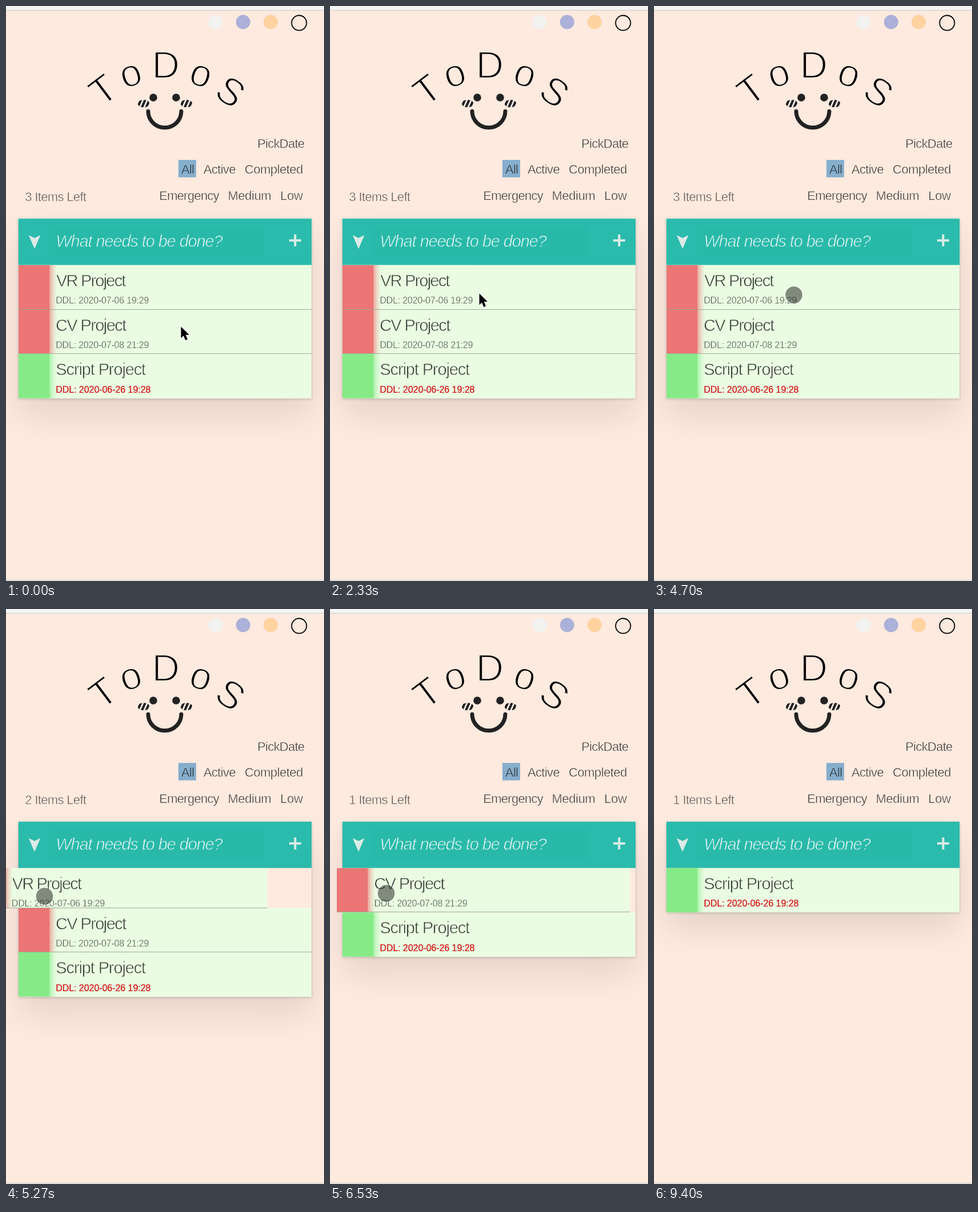
An HTML page that plays this animation: 557x1005 px, repeating every 9.43 s.

```html
<!DOCTYPE html>
<html lang="en">
<head>
<meta charset="utf-8">
<title>Todos</title>
<style>
  html, body { margin: 0; width: 100%; height: 100%; overflow: hidden; background: #feeadf; }
  #panel {
    position: absolute; left: 22px; top: 372px; width: 513px;
    box-shadow: 0 2.3px 4.7px rgba(0,0,0,.2), 0 29px 58px rgba(0,0,0,.1);
  }
  #stage { position: absolute; left: 0; top: 0; display: block; }
  text { font-family: "Liberation Sans", Arial, sans-serif; white-space: pre; }
  /* a thin outline in the backdrop colour gives the light weight */
  .logo { font-size: 67.5px; fill: #000; stroke: #feeadf; stroke-width: 2.3; text-anchor: middle; }
  .nav { font-size: 22px; fill: #2f2f2f; stroke: #feeadf; stroke-width: .6; }
  .count { fill: #565250; }
  .on { stroke: #86aecd; }
  .hint { font-size: 29px; font-style: italic; fill: #e6f5f2; stroke: #2abbac; stroke-width: .8; letter-spacing: -1.12px; }
  .name { font-size: 29px; fill: #2f332e; stroke: #eafde3; stroke-width: .8; }
  .due { font-size: 16px; fill: #4d524b; stroke: #eafde3; stroke-width: .35; letter-spacing: -.2px; }
  .late { fill: #d50b0b; stroke: #d50b0b; stroke-width: .2; letter-spacing: -.05px; }
</style>
</head>
<body>
<div id="panel"></div>
<svg id="stage" width="557" height="1005" viewBox="0 0 557 1005">
  <defs>
    <g id="blush">
      <clipPath id="cheek"><ellipse rx="10.3" ry="6.6"/></clipPath>
      <g clip-path="url(#cheek)">
        <ellipse rx="10.3" ry="6.6" fill="#fff3ea"/>
        <path d="M-11 8L-4 -8M-3.5 8L3.5 -8M4 8L11 -8" stroke="#222" stroke-width="4.2"/>
      </g>
    </g>
  </defs>
  <rect width="557" height="7" fill="#f4f4f3"/>
  <rect y="7" width="557" height="1" fill="#c9cdca"/>
  <rect y="1003" width="557" height="1" fill="#cbcac6"/>
  <rect y="1004" width="557" height="1" fill="#f4f0ec"/>

  <circle cx="367" cy="28" r="12.5" fill="#f2f2f1"/>
  <circle cx="415.3" cy="28" r="12.5" fill="#abb1d8"/>
  <circle cx="463.5" cy="28" r="12.5" fill="#ffd2a0"/>
  <circle cx="513.4" cy="29.6" r="13.1" fill="none" stroke="#000" stroke-width="1.8"/>

  <g id="logo"></g>
  <g fill="#222">
    <circle cx="258" cy="160" r="6.8"/>
    <circle cx="298" cy="160" r="6.8"/>
    <path d="M249 184A29 28.5 0 0 0 307 184" fill="none" stroke="#222" stroke-width="7" stroke-linecap="round"/>
  </g>
  <use href="#blush" x="241" y="170.5"/>
  <use href="#blush" x="316" y="170.5"/>

  <rect x="302" y="269" width="31" height="30.5" fill="#86aecd"/>
  <g id="nav"></g>

  <rect x="21.7" y="371.7" width="513.6" height="81" fill="#2abbac"/>
  <rect x="76" y="385" width="376" height="52" fill="#29b9a9"/>
  <path d="M39.7 400.5L50 405.5 60.3 400.5 50 424.5Z" fill="#dcebe7"/>
  <path d="M496 409.8H517M506.5 399.3V420.3" stroke="#dcebe7" stroke-width="4"/>
  <text class="hint" x="87.3" y="420.5">What needs to be done?</text>

  <g id="rows"></g>
  <g id="rules"></g>

  <g id="arrow">
    <path d="M.5 .5V20.5L5 16.3 8.3 24.2 12 22.6 8.8 14.8H15Z" fill="#000" stroke="#fff" stroke-width="2" stroke-linejoin="round" paint-order="stroke"/>
  </g>
  <g id="touch">
    <circle r="15.8" fill="none" stroke="#fff" stroke-opacity=".35" stroke-width="2"/>
    <circle r="14.8" fill="rgb(40,45,40)" fill-opacity=".55"/>
  </g>
</svg>
<script>
const LOOP = 9430, TOP = 452.7, ROW = 77.7, LEFT = 21.7, WIDTH = 513.6, SLIDE = 880;
const $ = id => document.getElementById(id);

function add(parent, tag, attrs, content) {
  const node = document.createElementNS('http://www.w3.org/2000/svg', tag);
  for (const key in attrs) node.setAttribute(key, attrs[key]);
  if (content) node.textContent = content;
  parent.appendChild(node);
  return node;
}

// letter, centre x, centre y, turn, half height
[['T', 170, 146.5, -37, 23.2], ['o', 219.3, 122.5, -18, 17.8],
 ['D', 279.8, 103, 0, 23.2], ['o', 340.5, 122.5, 18, 17.8], ['S', 393.5, 150, 35, 23.2]]
  .forEach(([ch, x, y, turn, half]) =>
    add($('logo'), 'text', { class: 'logo', y: half, transform: `translate(${x} ${y}) rotate(${turn})` }, ch));

function label(str, x, y, gap, extra = '') {
  return add($('nav'), 'text', { class: 'nav ' + extra, x, y, style: `letter-spacing:${gap}px` }, str);
}
label('PickDate', 440.3, 248, -.72);
label('All', 307, 292.7, -.6, 'on');
label('Active', 346, 292.7, -.65);
label('Completed', 418, 292.7, -.48);
label('Emergency', 268.3, 339.3, -.74);
label('Medium', 388.5, 339.3, -.36);
label('Low', 480.3, 339.3, -.27);
const count = label('3 Items Left', 33.2, 341, -.65, 'count');

const rows = [
  { name: 'VR Project', x: 66.3, gap: -1.8, due: '2020-07-06 19:29', tint: '#ec7575', leave: 4958 },
  { name: 'CV Project', x: 65.3, gap: -1.6, due: '2020-07-08 21:29', tint: '#ec7575', leave: 6430 },
  { name: 'Script Project', x: 65.6, gap: -1.12, due: '2020-06-26 19:28', tint: '#86ea86', late: true }
];
rows.forEach((row, i) => {
  row.box = add($('rows'), 'svg', { width: WIDTH, overflow: 'hidden' });
  const glow = add(row.box, 'linearGradient', { id: 'glow' + i });
  [[0, .65], [.45, .27], [1, 0]].forEach(([offset, alpha]) =>
    add(glow, 'stop', { offset, 'stop-color': row.tint, 'stop-opacity': alpha }));
  add(row.box, 'rect', { width: WIDTH, height: ROW, fill: '#eafde3' });
  add(row.box, 'rect', { x: 54.3, width: 13, height: ROW, fill: `url(#glow${i})` });
  add(row.box, 'rect', { width: 54.3, height: ROW, fill: row.tint });
  add(row.box, 'text', { class: 'name', x: row.x, y: 37.3, style: `letter-spacing:${row.gap}px` }, row.name);
  add(row.box, 'text', { class: row.late ? 'due late' : 'due', x: 65.5, y: 67.8 }, 'DDL: ' + row.due);
  if (!row.late) row.rule = add($('rules'), 'rect', { width: WIDTH, height: 1 });
});

// time, x, y
const pointer = [[0, 306, 560], [2330, 261, 502], [3830, 217, 495], [3900, 217, 495]];
const finger = [[3900, 217, 500], [4500, 245, 505], [4700, 245, 505], [5000, 72, 503], [5270, 67.5, 502],
  [5500, 67.5, 502], [6050, 240, 498], [6250, 240, 498], [6530, 98.5, 497], [6750, 57.5, 491], [7700, 57.5, 491]];

function place(node, path, t) {
  const k = path.findIndex((p, i) => i && t < p[0]);
  node.style.display = k < 0 || t < path[0][0] ? 'none' : '';
  if (k < 0) return;
  const [t0, x0, y0] = path[k - 1], [t1, x1, y1] = path[k];
  let u = Math.max(0, (t - t0) / (t1 - t0));
  u = u * u * (3 - 2 * u);
  node.setAttribute('transform', `translate(${x0 + (x1 - x0) * u} ${y0 + (y1 - y0) * u})`);
}

function draw(t) {
  let y = TOP, left = 0;
  for (const row of rows) {
    const u = Math.max(0, (t - row.leave) / SLIDE || 0);
    const display = u >= 1 ? 'none' : '';
    row.box.style.display = display;
    if (row.rule) row.rule.style.display = display;
    if (!u) left++;
    if (display) continue;
    const dx = 513 * u ** 1.83;
    const h = Math.max(1, ROW - 8 * (dx / 77) ** 1.72);
    row.box.setAttribute('x', LEFT - dx);
    row.box.setAttribute('y', y);
    row.box.setAttribute('height', h);
    y += h;
    if (row.rule) {
      row.rule.setAttribute('x', LEFT - dx);
      row.rule.setAttribute('y', Math.round(y - .7));
      row.rule.setAttribute('fill', h < 2 ? '#2abbac' : '#a0a799');
    }
  }
  $('panel').style.height = y - 372 + 'px';
  const str = left + ' Items Left';
  if (count.textContent !== str) count.textContent = str;
  place($('arrow'), pointer, t);
  place($('touch'), finger, t);
}

const start = performance.now();
function tick() {
  draw((performance.now() - start) % LOOP);
  requestAnimationFrame(tick);
}
tick();
</script>
</body>
</html>
```
